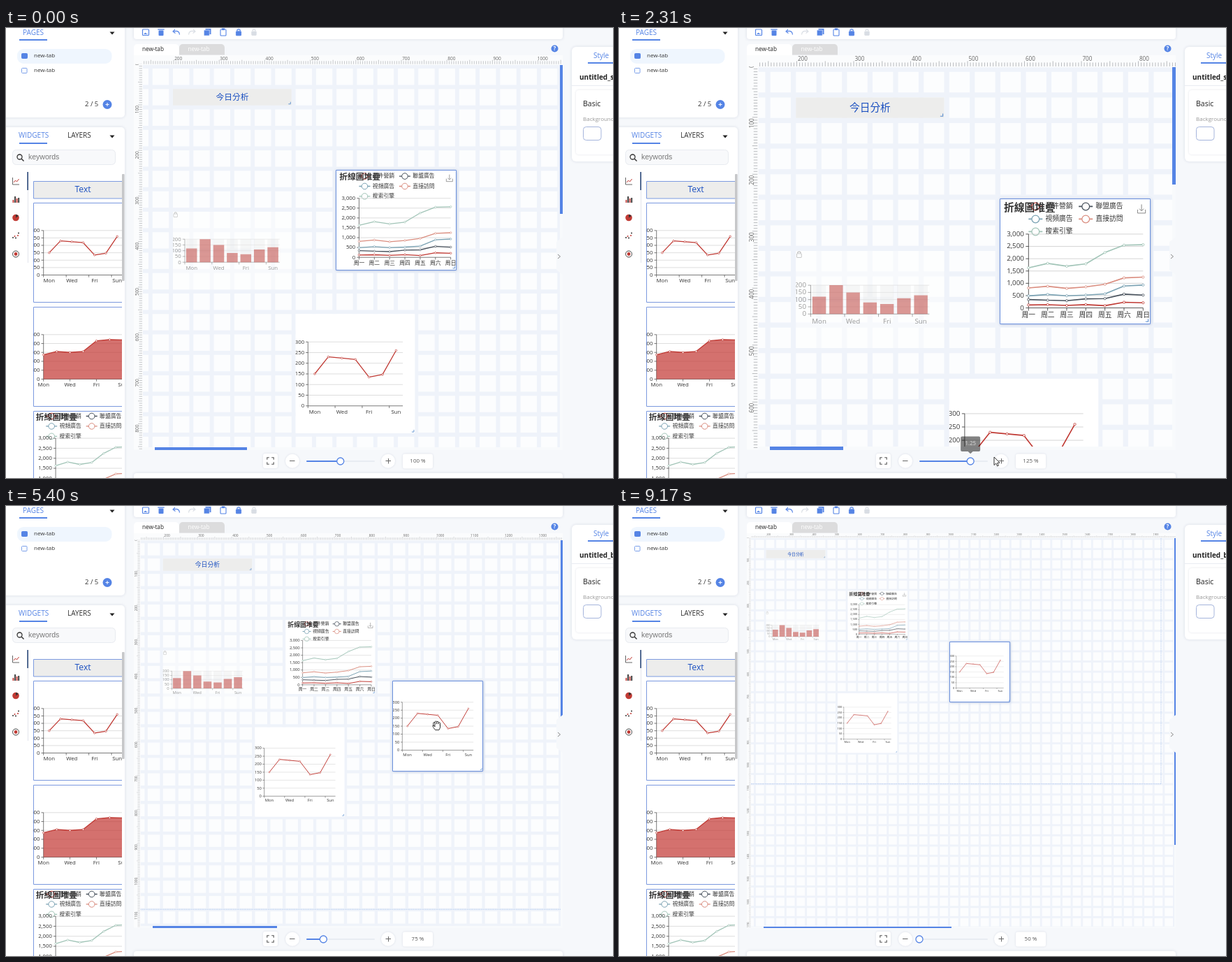
Recreate the animation shown at these times as an HTML page with a canvas. Size 869 by 644 pixels, loop 9.83 s.

```html
<!DOCTYPE html>
<html lang="en">
<head>
<meta charset="utf-8">
<title>Dashboard editor</title>
<style>
html, body { margin: 0; width: 100%; height: 100%; overflow: hidden; background: #f6f8fb; }
canvas { display: block; width: 869px; height: 644px; }
</style>
</head>
<body>
<canvas id="stage" width="869" height="644"></canvas>
<script>
const c = document.getElementById('stage').getContext('2d');
const LOOP = 9830, BLUE = '#5584e5', DARK = '#333';
const SANS = '"Open Sans","Noto Sans CJK TC","Noto Sans CJK JP","Noto Sans CJK SC","Noto Sans CJK",sans-serif';
const RED = '#c03a34', COLORS = [RED, '#47515c', '#7aa2b3', '#da8d7f', '#a1c4b7'];
const DAYS = ['Mon', 'Tue', 'Wed', 'Thu', 'Fri', 'Sat', 'Sun'];
const WEEK = [...'一二三四五六日'].map(d => '周' + d);
const LINE = [150, 230, 224, 218, 135, 147, 260];
const AREA = [820, 932, 901, 934, 1290, 1330, 1320];
const BARS = [120, 200, 150, 80, 70, 110, 130];
const STACK = [
  [120, 132, 101, 134, 90, 230, 210],
  [340, 314, 292, 368, 380, 560, 520],
  [490, 546, 493, 522, 570, 890, 930],
  [810, 878, 794, 856, 960, 1220, 1250],
  [1630, 1810, 1695, 1790, 2250, 2550, 2570]
];
const LEGEND = ['郵件營銷', '聯盟廣告', '視頻廣告', '直接訪問', '搜索引擎'];

// Canvas origin, grid pitch and cell size at 100 %
const OX = 182, OY = 38.7, PITCH = 29.27, CELL = 23.45;
const gx = i => 57 + PITCH * i, gy = j => 48.6 + PITCH * j, span = n => n * PITCH - 5.82;

const ZOOM = [[0, 1], [560, 1.25], [820, 1.5], [1640, 1.25], [2800, 1], [3400, .75], [6840, .5]];
const PRESS = [[400, 2000], [2560, 3650], [4560, 5230], [6620, 7050], [7600, 8300], [8480, 8960]];
const TIPS = [[330, 2430], [2480, 3850], [6455, 7250]];
const PATH = [
  [180, 500, 560, 'arrow'], [380, 479, 617, 'point'], [900, 530, 605, 'point'], [1080, 530, 605, 'point'],
  [1700, 505, 612, 'point'], [2050, 505, 614, 'arrow'], [2290, 537, 614, 'arrow'], [2380, 537, 614, 'arrow'],
  [2540, 504, 616, 'point'], [3450, 455, 616, 'point'], [3800, 452, 618, 'arrow'], [4200, 300, 480, 'arrow'],
  [4420, 107, 346, 'grab'], [4560, 107, 346, 'grab'], [5190, 617, 314, 'grab'], [5500, 617, 314, 'arrow'],
  [6420, 443, 629, 'grab'], [6540, 443, 629, 'grab'], [6600, 450, 622, 'point'], [6950, 430, 616, 'point'],
  [7150, 420, 610, 'arrow'], [7580, 345, 265, 'move'], [8260, 363, 305, 'move'], [8310, 363, 305, 'arrow'],
  [8480, 473, 222, 'move'], [8950, 517, 237, 'move'], [9000, 520, 240, 'arrow'], [9165, 586, 430, 'arrow']
];

const clamp = (v, a = 0, b = 1) => Math.max(a, Math.min(b, v));
const mix = (a, b, k) => a + (b - a) * k;
const ramp = (t, a, b) => clamp((t - a) / (b - a));
const inside = (list, t) => list.some(([a, b]) => t >= a && t < b);

function text(s, x, y, size, color = DARK, align = 'left', weight = 400, font = SANS) {
  c.font = `${weight} ${size}px ${font}`;
  c.fillStyle = color;
  c.textAlign = align;
  c.textBaseline = 'middle';
  c.fillText(s, x, y + size * .04);
}
function box(x, y, w, h, fill, r = 0, stroke, lw = 1) {
  c.beginPath();
  c.roundRect(x, y, w, h, r);
  if (fill) { c.fillStyle = fill; c.fill(); }
  if (stroke) { c.strokeStyle = stroke; c.lineWidth = lw; c.stroke(); }
}
function path(pts, color, lw = 1, fill) {
  c.beginPath();
  pts.forEach(p => c.lineTo(p[0], p[1]));
  if (fill) { c.closePath(); c.fillStyle = fill; c.fill(); }
  if (color) { c.strokeStyle = color; c.lineWidth = lw; c.stroke(); }
}
const seg = (x1, y1, x2, y2, color, lw) => path([[x1, y1], [x2, y2]], color, lw);
function dot(x, y, r, fill, stroke, lw = 1) {
  c.beginPath();
  c.arc(x, y, r, 0, 7);
  if (fill) { c.fillStyle = fill; c.fill(); }
  if (stroke) { c.strokeStyle = stroke; c.lineWidth = lw; c.stroke(); }
}
function clipped(x, y, w, h, draw) {
  c.save();
  c.beginPath();
  c.rect(x, y, w, h);
  c.clip();
  draw();
  c.restore();
}
function shadowed(draw, blur = 4, color = 'rgba(40,60,100,.14)') {
  c.save();
  c.shadowBlur = blur;
  c.shadowColor = color;
  draw();
  c.restore();
}

// ---- charts, sized at 100 % ----
function axes(L, T, R, B, max, step, cats, gap, every) {
  const n = cats.length, w = (R - L) / (gap ? n : n - 1);
  const px = i => L + w * (gap ? i + .5 : i), py = v => B - (B - T) * v / max;
  for (let v = 0; v <= max; v += step) {
    if (v) seg(L, py(v), R, py(v), '#ccc', .65);
    seg(L - 3.2, py(v), L, py(v), DARK, .65);
    text(v.toLocaleString('en'), L - 5.2, py(v), 7.8, DARK, 'right');
  }
  seg(L, T, L, B, DARK, .65);
  seg(L, B, R, B, DARK, .65);
  cats.forEach((s, i) => {
    if (i % every) return;
    seg(L + w * i, B, L + w * i, B + 3.2, DARK, .65);
    text(s, px(i), B + 8.6, 7.8, DARK, 'center');
  });
  return { px, py, w };
}
function series(data, a, color) {
  const pts = data.map((v, i) => [a.px(i), a.py(v)]);
  c.lineJoin = 'bevel';
  path(pts, color, 1.3);
  pts.forEach(p => dot(p[0], p[1], 1.3, '#fff', color, .65));
}
const dayAxes = (x, y, w, h, max, step, gap) =>
  axes(x + w * .1, y + 39.3, x + w * .9, y + h - 39, max, step, DAYS, gap, 2);

function lineChart(x, y, w, h) {
  series(LINE, dayAxes(x, y, w, h, 300, 50, true), RED);
}
function areaChart(x, y, w, h) {
  const a = dayAxes(x, y, w, h, 1500, 300, false);
  const top = AREA.map((v, i) => [a.px(i), a.py(v)]);
  path([...top, [a.px(6), a.py(0)], [a.px(0), a.py(0)]], null, 1, 'rgba(194,53,49,.7)');
  series(AREA, a, RED);
}
function barChart(x, y, w, h) {
  const a = dayAxes(x, y, w, h, 200, 50, true), bw = a.w * .8;
  BARS.forEach((v, i) => {
    const l = a.px(i) - bw / 2;
    box(l, a.py(200), bw, a.py(0) - a.py(200), 'rgba(220,220,220,.5)');
    box(l, a.py(v), bw, a.py(0) - a.py(v), RED);
  });
}
function stackChart(x, y, w, h, icon) {
  const mid = x + w / 2;
  LEGEND.forEach((s, i) => {
    const lx = mid + (i % 2 ? 12.2 : -45.3), ly = y + 7 + 14.4 * (i >> 1);
    seg(lx - 8, ly, lx + 8, ly, COLORS[i], 1.3);
    dot(lx, ly, 4.3, '#fff', COLORS[i], 1);
    text(s, lx + 11.4, ly, 7.8);
  });
  text('折線圖堆疊', x + 3.3, y + 8.6, 11.8, DARK, 'left', 700);
  const a = axes(x + 31.6, y + 38.6, x + w - 7, y + h - 17.4, 3000, 500, WEEK, false, 1);
  STACK.forEach((d, i) => series(d, a, COLORS[i]));
  if (!icon) return;
  const ix = x + 161, iy = y + 9.6;
  path([[ix - 4.5, iy + 1], [ix - 4.5, iy + 5], [ix + 4.5, iy + 5], [ix + 4.5, iy + 1]], '#777', .7);
  seg(ix, iy - 5, ix, iy + 2, '#777', .7);
  path([[ix - 2.5, iy], [ix, iy + 2.5], [ix + 2.5, iy]], '#777', .7);
}

function padlock(x, y, s, color, filled) {
  box(x - 3 * s, y - s, 6 * s, 5 * s, filled ? color : null, s * .6, color, s * .7);
  c.beginPath();
  c.arc(x, y - 1.5 * s, 2 * s, Math.PI, 0);
  c.strokeStyle = color;
  c.lineWidth = s;
  c.stroke();
}

// ---- workspace ----
function corner(x, y, w, h) {
  path([[x + w - 1.5, y + h - 5], [x + w - 1.5, y + h - 2], [x + w - 4.5, y + h - 2]], '#5b8fd0', .9);
}
// One-pixel frame on whole pixels, whatever the zoom
function frameBox(x, y, w, h, z, color) {
  const snap = (v, o) => Math.floor(o + v * z) + .5;
  const l = snap(x, OX), t = snap(y, OY), r = snap(x + w, OX), b = snap(y + h, OY);
  c.save();
  c.setTransform(1, 0, 0, 1, 0, 0);
  shadowed(() => box(l, t, r - l, b - t, '#fff'), 4, 'rgba(60,90,150,.4)');
  box(l, t, r - l, b - t, '#fff', 0, color);
  c.restore();
}
function widget(x, y, w, h, selected, draw, z) {
  if (selected) frameBox(x - .4, y - .8, w + 2, h + 2.6, z, '#6b90dd');
  else box(x, y, w + 1, h + 1, '#fff');
  clipped(x, y, w + 1.4, h + 1, () => draw(x + .7, y + .7, w, h, true));
  corner(x + 1, y + 1, w, h);
}
function dragged(x, y, w, h, z) {
  const o = 3.5 / z;
  box(x - o, y - o, w + 2 * o, h + 2 * o, 'rgba(255,255,255,.6)', 0, '#a9c0ee', 1 / z);
  box(x, y, w, h, '#fff', 0, '#8ca9e6', 1 / z);
}
const slot = (x, y, w, h) => box(x, y, w, h, 'rgba(145,200,243,.48)');

function rulers(z) {
  const tick = '#a2a4a8', label = '#666';
  box(0, 0, 640 / z, 14, '#fbfcfd');
  box(0, 0, 14, 600 / z, '#fbfcfd');
  clipped(14, 0, 640 / z, 14, () => {
    for (let u = 100; 58 + .652 * (u - 200) < 616 / z; u += 5) {
      const x = 58 + .652 * (u - 200);
      seg(x, u % 50 ? 8.6 : 7, x, 13, tick, .6);
      if (u % 100 === 0) text(u, x + 6.7, 4.9, 6.5, label, 'center');
    }
  });
  clipped(0, 13, 14, 600 / z, () => {
    for (let u = 0; 71.3 + .652 * (u - 100) < 566 / z; u += 5) {
      const y = 71.3 + .652 * (u - 100);
      seg(u % 50 ? 8.6 : 7, y, 13, y, tick, .6);
      if (u % 100) continue;
      c.save();
      c.translate(6.5, y + 6.7);
      c.rotate(-Math.PI / 2);
      text(u, 0, 0, 6.5, label, 'center');
      c.restore();
    }
  });
}

function workspace(t, z) {
  const W = span(6), bar = Math.round(3.6 * z);
  box(183, 39, 614, 565, '#f8fafc');
  clipped(183, 39, 614 - bar, 565 - bar, () => {
    c.translate(OX, OY);
    c.scale(z, z);
    box(14, 14, 1300, 1200, '#eff3fa');
    c.fillStyle = '#fcfdfe';
    for (let i = -2; gx(i) < 615 / z; i++)
      for (let j = -2; gy(j) < 566 / z; j++) c.fillRect(gx(i), gy(j), CELL, CELL);
    c.setLineDash([1.5 / z, 1 / z]);
    path([[14, 718], [1188, 718], [1188, 14]], '#a9c3ee', .8 / z);
    c.setLineDash([]);

    box(gx(0), gy(0), W, CELL, '#ededec');
    text('今日分析', gx(0) + W / 2, gy(0) + CELL / 2, 11.75, '#1a4fc0', 'center');
    corner(gx(0), gy(0), W, CELL);

    c.save();
    c.globalAlpha = .5;
    box(gx(0), gy(6), W, span(4), '#fff');
    clipped(gx(0), gy(6), W, span(4), () => barChart(gx(0), gy(6), W, span(4)));
    padlock(gx(0) + 3.7, gy(6) + 4, .9, '#777');
    c.restore();

    widget(gx(8), gy(4), W, span(5), t < 5230, stackChart, z);

    const moveA = t >= 7600 && t < 8300, moveB = t >= 8480 && t < 8960;
    if (!moveA) {
      const k = t >= 8300;
      widget(gx(k ? 7 : 6), gy(k ? 14 : 11), W, W, k && t < 8480, lineChart, z);
    }
    if (t >= 5230 && !moveB) {
      const k = t >= 8960;
      widget(gx(k ? 18 : 15), gy(k ? 9 : 8), W, W, t < 7600 || t >= 8480, lineChart, z);
    }
    if (moveA) {
      const k = ramp(t, 7620, 8260);
      dragged(mix(gx(6), 268, k), mix(gy(11), 451, k), W, W, z);
      slot(mix(gx(6), gx(7), ramp(t, 7900, 8050)), mix(gy(11), gy(14), ramp(t, 8180, 8326)), W, W);
    }
    if (moveB) {
      const k = ramp(t, 8500, 8930);
      dragged(mix(gx(15), gx(18), k), mix(gy(8), gy(9), k), W, W, z);
      slot(gx(15 + Math.round(3 * k)), gy(8 + Math.round(k)), W, W);
    }
    if (t > 4800 && t < 5230) {
      const k = ramp(t, 4560, 5190);
      slot(gx(Math.round(mix(-6, 15, k))), gy(Math.round(mix(9, 8, k))), W, W);
    }
  });
  clipped(183, 39, 614, 564, () => {
    c.translate(OX, OY);
    c.scale(z, z);
    rulers(z);
  });
  box(797 - bar, Math.round(39 + 13.5 * z), bar, Math.round(226 / z - 13), BLUE);
  box(Math.round(201 + 12 * z), 604 - bar, Math.round(137 / z - 5), bar, BLUE);
  path([[797, 299], [788, 306], [788, 346], [797, 353]], null, 1, '#f6f8fb');
  path([[790, 324], [793.5, 327], [790, 330]], '#888', 1);
}

// ---- fixed panels ----
function caret(x, y) { path([[x - 3.5, y - 1.5], [x + 3.5, y - 1.5], [x, y + 2.5]], null, 1, '#222'); }

function miniCard(y, draw) {
  shadowed(() => box(39.5, y, 142, 142, '#fff'), 3);
  box(39.5, y, 142, 142, '#fff', 0, '#7d9be0', 1);
  clipped(39, y, 142, 142, () => draw(39.5, y, 142, 142));
}
function leftPanel(t) {
  shadowed(() => { box(-6, -6, 176, 134, '#fff', 5); box(-6, 142, 176, 520, '#fff', 5); });
  text('PAGES', 24, 7, 10, BLUE);
  box(19, 16, 40, 2, BLUE);
  caret(152, 7);
  box(16, 30, 135.5, 21, '#eff6fe', 9);
  box(22.5, 36.5, 8, 7, BLUE, 1, BLUE);
  box(22.5, 57.5, 7.5, 7, '#fff', 1, '#7ba0ea');
  text('new-tab', 40, 40, 8);
  text('new-tab', 40, 61, 8);
  text('2 / 5', 113, 109, 9.5);
  dot(145, 109.5, 6.5, BLUE);
  seg(142.5, 109.5, 147.5, 109.5, '#fff', 1);
  seg(145, 107, 145, 112, '#fff', 1);

  text('WIDGETS', 18, 154, 10, BLUE);
  text('LAYERS', 88, 154, 10);
  box(19, 164, 40, 2, BLUE);
  caret(152, 155);
  box(9.5, 174.5, 147, 21, '#f8f9fb', 5, '#e8ebf0');
  dot(19.5, 184.5, 3.5, null, '#333', 1.3);
  seg(22, 187, 25.5, 190.5, '#333', 1.4);
  text('keywords', 32, 185, 10.5, '#777', 'left', 400, '"Liberation Sans",sans-serif');

  path([[9.5, 214], [9.5, 224], [19, 224]], '#555', .9);
  path([[11, 221], [13.5, 218], [15.5, 220], [18.5, 216]], RED, 1);
  [4, 9, 6, 7].forEach((h, i) => box(9.5 + i * 2.6, 250 - h, 1.8, h, i % 2 ? '#333' : RED));
  dot(14, 271.5, 4.8, RED);
  path([[14, 271.5], [14, 266.7], [18, 268.8]], null, 1, '#333');
  [[10, 300], [12.5, 298], [14, 300.5], [17, 297], [18, 293.5]].forEach(([x, y], i) => dot(x, y, 1, i % 2 ? RED : '#333'));
  dot(14, 323.5, 4.5, '#fff', '#444', 1);
  dot(14, 323.5, 2.4, RED);
  box(31, 206, 1, 130, '#e3e6ec');
  box(30.3, 206, 1.7, 26, '#34507f');

  clipped(38, 206, 128, 438, () => {
    box(39.5, 219.5, 142, 24.5, '#ededec', 0, '#7d9be0');
    text('Text', 110, 231.5, 12.2, '#1a4fc0', 'center');
    miniCard(250.5, lineChart);
    miniCard(399.5, areaChart);
    miniCard(548.5, stackChart);
    if (t >= 4380 && t < 4760) {
      box(39, 250.5, 142, 143, 'rgba(85,132,229,.7)');
      text('basic-line-chart', 110, 322, 12.1, '#fff', 'center');
    }
  });
  box(166, 209, 3.6, 153, '#c6c7c9', 1);
}

function toolbar() {
  shadowed(() => { box(183, -8, 614, 24, '#fff', 4); box(183, 637, 614, 20, '#fff', 4); });
  box(195.5, 2, 9, 8.5, '#fff', 1, BLUE, 1.2);
  path([[197, 9], [199.5, 6.5], [201, 8], [203.5, 9]], null, 1, BLUE);
  box(218.5, 3.5, 7, 7.5, BLUE, 1);
  box(217.3, 1.5, 9.4, 1.3, BLUE);
  [[244, 1, BLUE], [266, -1, '#d9dde4']].forEach(([x, d, color]) => {
    c.beginPath();
    c.moveTo(x - 4 * d, 5);
    c.quadraticCurveTo(x + 4 * d, 2.5, x + 4.5 * d, 9.5);
    c.strokeStyle = color;
    c.lineWidth = 1.2;
    c.stroke();
    path([[x - 2 * d, 2], [x - 5 * d, 5], [x - 1.5 * d, 7.5]], color, 1.1);
  });
  box(285.5, 1, 8, 8, BLUE);
  box(283.3, 3, 8, 8, BLUE, 0, '#fff', .6);
  box(307, 2, 8, 9, '#fff', 1, BLUE, 1.1);
  box(309, .5, 4, 2.6, BLUE);
  padlock(333, 6, 1.2, BLUE, true);
  padlock(355, 6, 1.1, '#d9dde4', true);

  box(183, 23, 64.5, 18, '#fff', [5, 5, 0, 0]);
  text('new-tab', 195, 30.5, 8.2, '#222');
  box(248, 23, 65, 15.5, '#dcdcdd', [5, 5, 0, 0]);
  text('new-tab', 260.5, 30.5, 8.2, '#fff');
  dot(785.5, 29.5, 5, BLUE);
  text('?', 785.5, 29.5, 8, '#fff', 'center', 700);
}

function rightPanel(t) {
  shadowed(() => box(810, 27, 80, 164, '#fff', 6));
  text('Style', 841, 40, 10, BLUE);
  box(833, 49, 40, 2, BLUE);
  text(t < 5230 ? 'untitled_stack' : 'untitled_basic', 821, 71, 10, '#222', 'left', 700);
  box(810, 82, 60, 1, '#e9ecf1');
  shadowed(() => box(816, 89, 70, 92, '#fff', 4), 3);
  text('Basic', 826, 109, 10.5, '#222');
  text('Background', 826, 131, 8, '#999');
  box(826.5, 141.5, 25.5, 19, '#fff', 4, '#a5b5dc');
}

function zoomBar(t, z) {
  const x = 430 + 97.5 * (z - .5);
  shadowed(() => {
    box(368, 609, 21, 21, '#fff', 3);
    dot(410, 619.7, 10, '#fff');
    dot(547, 619.7, 10, '#fff');
    box(568, 609.5, 43, 21, '#fff', 3);
  }, 3);
  for (const sx of [-1, 1]) for (const sy of [-1, 1]) {
    const px = 378.5 + 4.7 * sx, py = 619.5 + 4.7 * sy;
    path([[px - 3 * sx, py], [px, py], [px, py - 3 * sy]], '#555', 1.1);
  }
  seg(406, 619.5, 413.5, 619.5, '#666', 1);
  seg(543.5, 619.5, 551, 619.5, '#666', 1);
  seg(547.5, 616, 547.5, 623.5, '#666', 1);
  text(z * 100 + ' %', 589.5, 620, 8, '#555', 'center');
  box(430, 619, 98, 2, '#e8ecf2', 1);
  box(430, 619, x - 430, 2, BLUE, 1);
  dot(x, 620, 5, '#fff', BLUE, 1.3);

  const tip = TIPS.find(([a, b]) => t > a && t < b);
  if (!tip) return;
  const wide = z % .5 ? 28 : 24;
  c.save();
  c.globalAlpha = .88 * clamp(Math.min((t - tip[0]) / 150, (tip[1] - t) / 200));
  box(x - wide / 2, 584.5, wide, 21.5, '#111', 2);
  path([[x - 3.5, 606], [x + 3.5, 606], [x, 609.3]], null, 1, '#111');
  text(z, x, 595, 8, '#fff', 'center', 600);
  c.restore();
}

// ---- pointer ----
function hand(x, y, pointing) {
  c.save();
  c.translate(x, y);
  c.lineJoin = 'round';
  const fingers = pointing ? [[-2, -8, 9], [.5, -3.5, 5], [3, -3, 5]] : [[-4, -4.5, 6], [-1.6, -6, 7], [.8, -5.6, 7], [3.2, -4.2, 6]];
  fingers.forEach(([fx, fy, h]) => box(fx - 1.2, fy, 2.6, h, '#fff', 1.3, '#222', .9));
  path([[-6, 0], [-4, .5], [-3, 2], [-3, -1], [4.4, -1], [4.6, 3], [3, 6.5], [-2.5, 6.5], [-5.5, 2.5]], '#222', .9, '#fff');
  c.fillStyle = '#fff';
  c.fillRect(-2.4, -2, 6, 3);
  c.restore();
}
function cursor(t) {
  const i = PATH.findIndex(p => p[0] > t);
  if (i < 1) return;
  const [a, x0, y0, kind] = PATH[i - 1], [b, x1, y1] = PATH[i];
  const k = ramp(t, a, b), x = mix(x0, x1, k), y = mix(y0, y1, k);
  const down = inside(PRESS, t);
  if (down) dot(x, y + (kind === 'point' ? 8 : 0), 8.3, 'rgba(250,228,50,.85)');
  if (kind === 'point') hand(x, y + 8, true);
  else if (kind === 'grab') hand(x, y, false);
  else if (kind === 'move') {
    c.save();
    c.translate(x, y);
    for (let q = 0; q < 4; q++) {
      c.rotate(Math.PI / 2);
      path([[1.2, -1.2], [4, -1.2], [4, -3], [7.5, 0], [4, 3], [4, 1.2], [1.2, 1.2]], '#333', .9, '#fff');
    }
    c.restore();
  } else {
    const tip = [[0, 0], [0, 11.5], [2.7, 9], [4.6, 13], [6.4, 12.2], [4.6, 8.4], [8, 8.2]];
    path(tip.map(p => [x + p[0], y + p[1]]), '#222', .9, '#fff');
  }
}

function frame(now) {
  const t = now % LOOP;
  const z = ZOOM.filter(s => t >= s[0]).pop()[1];
  c.setTransform(1, 0, 0, 1, 0, 0);
  box(0, 0, 869, 644, '#f6f8fb');
  toolbar();
  workspace(t, z);
  leftPanel(t);
  rightPanel(t);
  zoomBar(t, z);
  cursor(t);
}
const start = performance.now();
function tick() {
  frame(performance.now() - start);
  requestAnimationFrame(tick);
}
tick();
</script>
</body>
</html>
```
